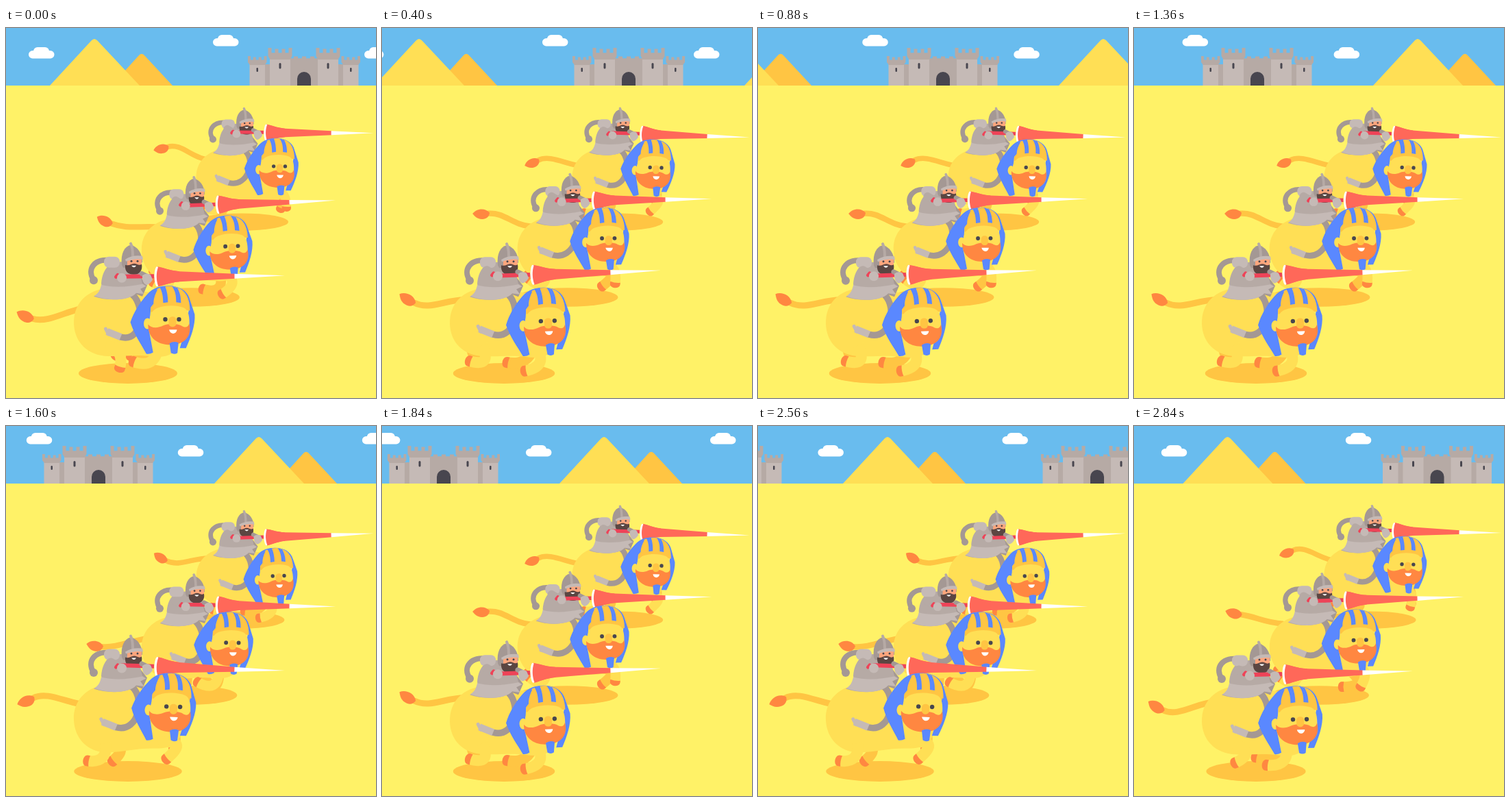
An HTML page with a canvas that plays this animation: 540x540 px, repeating every 2880 ms.

```html
<!DOCTYPE html>
<html lang="en">
<head>
<meta charset="utf-8">
<title>Desert charge</title>
<style>
html, body { margin: 0; width: 100%; height: 100%; overflow: hidden; background: #fff267; }
canvas { display: block; width: 540px; height: 540px; }
</style>
</head>
<body>
<canvas id="stage"></canvas>
<script>
const STEP = 40, FRAMES = 72, STRIDE = 12;
const SKY = '#69bcee', SAND = '#fff267', YELLOW = '#ffdf55', GOLD = '#ffc543', ORANGE = '#ff8741',
  RED = '#ff6859', CRIMSON = '#ee4358', BLUE = '#5a88ff', PALE = '#c5bab6', GREY = '#b6aaa5',
  STEEL = '#a49894', DARK = '#48464f', BROWN = '#5b4642', SKIN = '#ffa67d', WHITE = '#fff';

const canvas = document.getElementById('stage');
const g = canvas.getContext('2d');
const ratio = window.devicePixelRatio || 1;
canvas.width = canvas.height = 540 * ratio;

// Every moving part swings as a sum of waves over one stride.
function gait(p) {
  const wave = (size, peak, order = 1) => size * Math.cos(order * (p - peak) * 2 * Math.PI / STRIDE);
  return {
    shadow: 76.5 - wave(4.5, 0),
    head: -7.9 + wave(10.3, 11) - wave(1.5, 1, 2),
    sway: wave(1, 4),
    bob: -4.1 + wave(4.7, 10.8),
    lance: -7.6 + wave(7, 11.7),
    tilt: wave(2, 3.3),
    foot: [139.5 + wave(6.5, .8), 434.5 + wave(7.5, 0)],
    tail: { x: 33.5 + wave(9, 7.8), y: 399 + wave(27, 1.2), turn: wave(27, 10.4), root: 402 + wave(11.5, 1.9) },
    farBack: [142 + wave(30, 1.8), 477 + wave(17, 2.7)],
    farFront: [213 + wave(37, 5), 480 + wave(11, 8.5)],
    nearBack: [133 + wave(28, .7) + wave(11, .9, 2), 487 + wave(13, 1.2)],
    nearFront: [220 + wave(36, 6.3), 488.5 + wave(7, 9.8) + wave(6, 9.6, 2)]
  };
}

function fill(color, d) {
  g.fillStyle = color;
  g.fill(new Path2D(d));
}
function line(color, width, d, cap = 'round') {
  g.strokeStyle = color;
  g.lineWidth = width;
  g.lineCap = cap;
  g.lineJoin = 'round';
  g.stroke(new Path2D(d));
}
function oval(color, x, y, rx, ry = rx) {
  g.fillStyle = color;
  g.beginPath();
  g.ellipse(x, y, rx, ry, 0, 0, 7);
  g.fill();
}
function box(color, x, y, w, h, r = 0) {
  g.fillStyle = color;
  g.beginPath();
  g.roundRect(x, y, w, h, r);
  g.fill();
}
// Draws with a shift and a turn (degrees) about a pivot.
function posed(dx, dy, degrees, px, py, draw) {
  g.save();
  g.translate(px + dx, py + dy);
  g.rotate(degrees * Math.PI / 180);
  g.translate(-px, -py);
  draw();
  g.restore();
}
const shifted = (dx, dy, draw) => posed(dx, dy, 0, 0, 0, draw);

function cloud(x, y) {
  box(WHITE, x, y + 5, 37.5, 11.5, 5.75);
  box(WHITE, x + 7, y, 23, 14, 6);
}
function battlement(x, w, y, h, teeth) {
  const unit = w / (2 * teeth - 1);
  let d = `M${x},${y}`;
  for (let i = 0; i < teeth; i++) {
    const left = x + 2 * i * unit, top = y + (i % (teeth - 1) ? 1.5 : 0);
    d += `L${left},${top}H${left + unit}V${y + h * .42}`;
    if (i < teeth - 1) d += `H${left + 2 * unit}`;
  }
  fill(GREY, d + `V${y + h * .7}L${x + w - 3},${y + h}H${x + 3}L${x},${y + h * .7}Z`);
}
function tower(x, w, y, h) {
  box(PALE, x, y + h - 2, w, 86 - y - h);
  battlement(x - 2.5, w + 5, y, h, 4);
}
function castle() {
  box(GREY, 376, 53, 118, 31);
  box(GREY, 414, 45, 42, 39);
  battlement(408, 54, 40, 10, 5);
  for (const x of [355.5, 492]) tower(x, 22.5, 41, 13);
  for (const x of [385, 455]) tower(x, 30, 29, 17);
  for (const x of [398.5, 468.5]) box(DARK, x, 51, 3, 8.5, 1.5);
  for (const x of [365.5, 502]) box(DARK, x, 58, 2.5, 6, 1.2);
  box(DARK, 425, 64, 20, 20, [10, 10, 0, 0]);
}
function pyramids() {
  fill(GOLD, 'M154,84L193,41Q198,34.500 203,41L243,84Z');
  fill(YELLOW, 'M64,84L124.500,18.500Q129,13.500 133.500,18.500L195,84Z');
}
function scenery(frame) {
  box(SKY, 0, 0, 540, 84);
  for (const wrap of [0, 1]) {
    const turn = wrap - frame / FRAMES;
    shifted(turn * 490, 0, () => {
      cloud(33, 28);
      cloud(302, 10);
    });
    shifted(turn * 540, 0, () => {
      pyramids();
      castle();
    });
  }
  box(SAND, 0, 84, 540, 456);
}

// Two-bone leg with the knee bent forward.
function leg(hx, hy, bone, [x, y], color) {
  const dx = x - hx, dy = y - hy, reach = Math.hypot(dx, dy);
  const bend = 2 * Math.sqrt(Math.max(0, bone * bone - reach * reach / 4)) / reach;
  const kx = hx + dx / 2 + dy * bend, ky = hy + dy / 2 - dx * bend;
  line(color, 16, `M${hx},${hy}Q${kx},${ky} ${x},${y}`, 'butt');
  const angle = Math.atan2(y - ky, x - kx) * 180 / Math.PI;
  posed(x, y, angle, 0, 0, () => fill(ORANGE, 'M-4,-8H0C7,-7 7,7 0,8H-4Q-2,0 -4,-8Z'));
}
const backLeg = (hoof, color) => leg(146, 463, 22.5, hoof, color);
const frontLeg = (hoof, color) => leg(222, 462, 27, hoof, color);

function drawTail({ x, y, turn, root }) {
  const a = turn * Math.PI / 180;
  const along = r => `${x + r * Math.cos(a)},${y + r * Math.sin(a)}`;
  line(GOLD, 9, `M120,${root}C92,${root + (y - root) * .1} ${along(36)} ${along(11)}`);
  posed(x, y, turn, 0, 0, () => fill(ORANGE, 'M-14,-2C-8,-9 6,-11 13,-1C12,6 6,9 0,8C-8,7 -11,2 -14,-2Z'));
}
function body() {
  fill(YELLOW, 'M99,429C99,400 120,380 155,378L220,384C248,392 262,425 256,452C252,470 238,478 215,476C190,474 170,479 146,478.500C117,477 99,456 99,429Z');
}
function riderLeg([x, y], lift) {
  const ax = x + 22, ay = y + 9;
  line(STEEL, 9.5, `M180,${386 + lift}C205,${400 + lift} ${ax + 34},${ay + 9} ${ax},${ay}`);
  line(PALE, 10.5, `M${ax},${ay}L${x + 2},${y + 1}`, 'butt');
  line(PALE, 5, `M${x},${y - 3}L${x + 4},${y + 5}`);
}
function riderBody() {
  line(STEEL, 8, 'M154,340C130,335 117,352 128,368');
  oval(STEEL, 128, 368.500, 6);
  fill(STEEL, 'M192,358L206,376L199,392L180,385Z');
  fill(GREY, 'M153,345C165,338 187,342 194,352L199,373L205,377L196,381L201,389L190,387C183,397 150,400 128,392C137,388 141,379 139,373C140,361 144,350 153,345Z');
  fill(PALE, 'M139,375C157,380 180,378 199,374L204,377L196,381L201,388L190,387C180,398 151,400 129,391C135,388 138,381 139,375Z');
  box(PALE, 143, 334, 23, 16, 7);
  // head and helmet
  fill(STEEL, 'M169,346C167,329 173,319 182,317C192,319 199,329 199,342L190,349L171,350Z');
  line(GREY, 4, 'M182,315Q185,321 185,333');
  box(SKIN, 177, 336, 21, 15, 2);
  oval(DARK, 183, 340.500, 1.500);
  oval(DARK, 192, 340.500, 1.500);
  fill(BROWN, 'M174,346C180,348 183,344 187,344C191,344 194,348 198,345C200,354 194,361 186,360C178,360 173,355 174,346Z');
  fill(WHITE, 'M183,347H190Q187,352 183,347Z');
  fill(PALE, 'M174,338Q185,331 199,333L200,338Q188,336 175,341Z');
}
function lance() {
  line(CRIMSON, 6, 'M163,363H216', 'butt');
  fill(RED, 'M221,349C229,350 238,355 253,356L334,360V367L253,371C238,372 229,377 221,378Z');
  fill(WHITE, 'M333.500,360L407,363L333.500,367Z');
  oval(WHITE, 220.500, 363.500, 4, 14.500);
  fill(RED, 'M222,350C229,350 238,355 253,356V371C238,372 229,377 222,377C219,369 219,358 222,350Z');
}
function hands() {
  line(GREY, 13, 'M153,357L168,366');
  line(CRIMSON, 5, 'M160.500,364L163,361');
  oval(PALE, 169, 365.500, 7);
  line(STEEL, 7, 'M198,359L206,363');
  fill(PALE, 'M199,362Q205,357 211,361L214,368Q211,374 205,376Q198,373 199,362Z');
}
function head() {
  fill(BLUE, 'M207,388C216,378 227,376 238,376C254,376 266,384 269,396L276,418C277,434 270,452 263,467L254,467L262,440L268,408H212L209,440L215,473Q210,476 205,475C197,460 188,448 182,429C187,414 196,400 207,388Z');
  oval(YELLOW, 207, 431, 5.500, 8);
  fill(GOLD, 'M212,414C211,398 215,385 222,380C232,376 244,375 252,379C263,383 269,395 269,412Z');
  fill(BLUE, 'M211,408C211,396 215,386 219,382L222,381C218,389 216,395 216,402Z');
  fill(BLUE, 'M225,378L233,376.500C236,384 237,392 237,400L230,401C230,392 229,385 225,378Z');
  fill(BLUE, 'M243,376.500L251,379C255,387 256,393 256,401L249,400C249,390 248,384 243,376.500Z');
  fill(YELLOW, 'M209,436C209,420 213,411 222,408C234,404 250,404 260,408C267,411 269,422 268,436C266,452 254,460 239,460C222,460 210,452 209,436Z');
  fill(ORANGE, 'M208,432C212,438 222,438 230,434C236,431 250,431 256,434C262,438 266,437 268,431C272,449 262,462 240,462C220,462 207,450 208,432Z');
  box(GOLD, 238, 421, 11, 15, 5);
  oval(DARK, 233, 425, 3.200);
  oval(DARK, 253, 425, 3.200);
  fill(WHITE, 'M238.500,440H250C249,447.500 240,447.500 238.500,440Z');
  fill(BLUE, 'M239,460Q245,456 252,459L250.500,474Q246,477 241,474Z');
}
function charger(x, y, scale, p) {
  const pose = gait(p);
  g.save();
  g.translate(x, y);
  g.scale(scale, scale);
  g.translate(-178, -504);
  oval(GOLD, 178, 504, pose.shadow, 15);
  backLeg(pose.farBack, GOLD);
  frontLeg(pose.farFront, GOLD);
  drawTail(pose.tail);
  posed(0, pose.bob * .2, (pose.head + 7) * .35, 140, 430, body);
  backLeg(pose.nearBack, YELLOW);
  frontLeg(pose.nearFront, YELLOW);
  riderLeg(pose.foot, pose.bob);
  shifted(0, pose.bob, riderBody);
  posed(0, pose.lance, pose.tilt, 222, 363, lance);
  shifted(0, pose.lance, hands);
  posed(pose.sway, pose.head, pose.tilt, 243, 430, head);
  g.restore();
}

function draw(now) {
  const frame = Math.floor(now / STEP) % FRAMES;
  g.setTransform(ratio, 0, 0, ratio, 0, 0);
  scenery(frame);
  charger(344, 283, .84, frame + 6);
  charger(270.5, 393, .92, frame + 9);
  charger(178, 504, 1, frame);
}
function tick() {
  draw(performance.now());
  requestAnimationFrame(tick);
}
tick();
</script>
</body>
</html>
```
